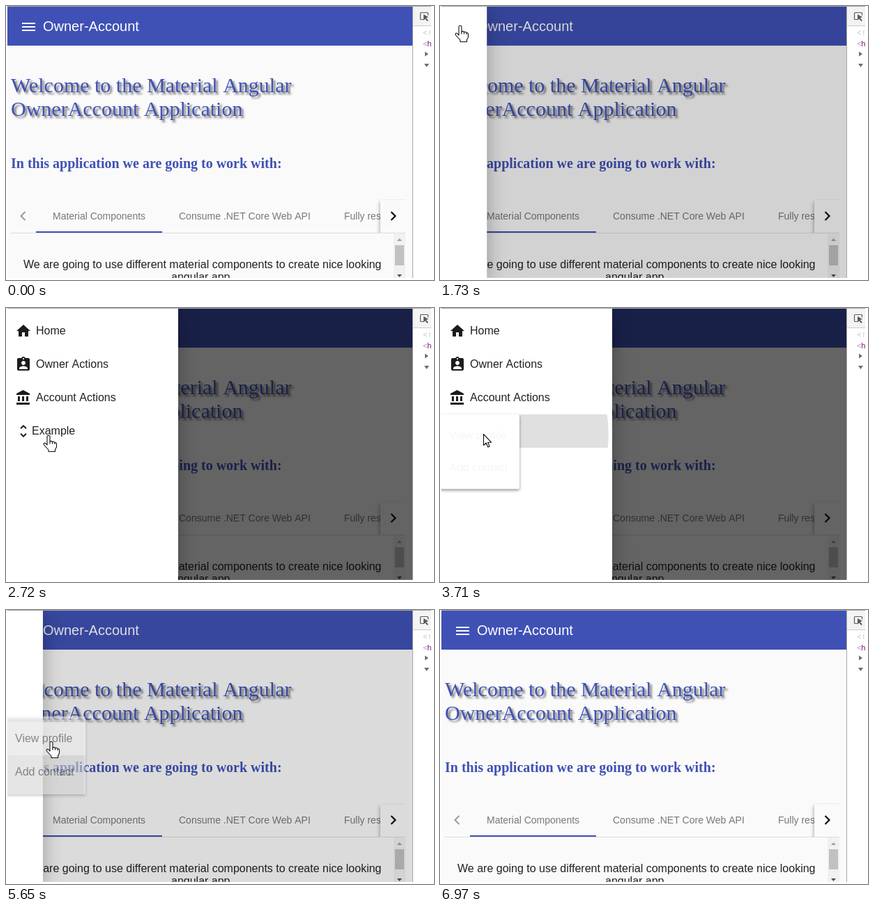
Recreate the animation shown at these times as an HTML page with a canvas. Size 614 by 394 pixels, loop 7100 ms.

```html
<!DOCTYPE html>
<html lang="en">
<head>
<meta charset="utf-8">
<title>Owner-Account</title>
<style>
html, body { margin: 0; width: 100%; height: 100%; overflow: hidden; background: #fff; }
canvas { display: block; }
</style>
</head>
<body>
<canvas id="stage" width="614" height="394"></canvas>
<script>
const ctx = document.getElementById('stage').getContext('2d');
const LOOP = 7100;
const SANS = '"Liberation Sans", Arial, sans-serif';
const SERIF = '"Liberation Serif", Times, serif';
const MONO = '"Liberation Mono", monospace';
const BLUE = '#3f51b5', INK = 'rgba(0,0,0,.87)';

const clamp = v => Math.min(1, Math.max(0, v));
const span = (t, start, length) => clamp((t - start) / length);

function bezier(x1, y1, x2, y2) {
  const at = (a, b, s) => 3 * (1 - s) * (1 - s) * s * a + 3 * (1 - s) * s * s * b + s * s * s;
  return x => {
    if (x <= 0 || x >= 1) return clamp(x);
    let lo = 0, hi = 1;
    for (let i = 0; i < 24; i++) {
      const mid = (lo + hi) / 2;
      if (at(x1, x2, mid) < x) lo = mid; else hi = mid;
    }
    return at(y1, y2, lo);
  };
}
const swift = bezier(.25, .8, .25, 1);
const decelerate = bezier(0, 0, .2, 1);
const late = bezier(.55, 0, .55, .2);

const icons = {
  home: 'M10 20v-6h4v6h5v-8h3L12 3 2 12h3v8z',
  owner: 'M19 3h-4.18C14.4 1.84 13.3 1 12 1c-1.3 0-2.4.84-2.82 2H5c-1.1 0-2 .9-2 2v14c0 1.1.9 2 2 2h14c1.1 0 2-.9 2-2V5c0-1.1-.9-2-2-2zm-7 0c.55 0 1 .45 1 1s-.45 1-1 1-1-.45-1-1 .45-1 1-1zm0 4c1.66 0 3 1.34 3 3s-1.34 3-3 3-3-1.34-3-3 1.34-3 3-3zm6 12H6v-1.4c0-2 4-3.1 6-3.1s6 1.1 6 3.1V19z',
  bank: 'M4 10v7h3v-7H4zm6 0v7h3v-7h-3zM2 22h19v-3H2v3zm14-12v7h3v-7h-3zm-4.5-9L2 6v2h19V6l-9.5-5z',
  unfold: 'M12 5.83L15.17 9l1.41-1.41L12 3 7.41 7.59 8.83 9 12 5.83zm0 12.34L8.83 15l-1.41 1.41L12 21l4.59-4.59L15.17 15 12 18.17z'
};
const arrow = ['M.5 .5V16.5l3.7-3.5 2.6 6 2.4-1-2.6-5.8h5z'];
const hand = [
  'M-2 1.5Q0-1 2 1.5V9q2-1.5 3.5.5 2-1 3.5 1 2.2-.4 2.5 1.5V17l-2 3.5v3h-9.5v-2.5L-6 14.5q-2-3 .5-3.5 1.500 0 3.500 3z',
  'M2 9v3.500M5.500 9.500v3M9 10.500v2.500'
];
const drawerItems = [
  ['home', 'Home', 43], ['owner', 'Owner Actions', 43],
  ['bank', 'Account Actions', 43], ['unfold', 'Example', 37]
];

// time, x, y of the pointer's hot spot
const track = [
  [610, 72, 352], [720, 38, 230], [820, 12, 130], [920, 26, 87], [1060, 25, 70],
  [1160, 24, 43], [1310, 29, 28], [2170, 29, 28], [2720, 61, 183], [2860, 62, 181],
  [4300, 62, 181], [4490, 62, 224], [4820, 62, 224], [5210, 65, 189],
  [6200, 65, 189], [6215, 91, 275], [6280, 91, 275]
];
const handTimes = [[1160, 3475], [4000, 5790]];

function rect(x, y, w, h, color) {
  ctx.fillStyle = color;
  ctx.fillRect(x, y, w, h);
}

function text(str, x, y, font, color) {
  ctx.font = font;
  ctx.fillStyle = color;
  ctx.fillText(str, x, y);
}

function shape(points, color) {
  ctx.fillStyle = color;
  ctx.fill(new Path2D('M' + points + 'z'));
}

function line(path, color, width) {
  ctx.strokeStyle = color;
  ctx.lineWidth = width;
  ctx.stroke(new Path2D(path));
}

function shadow(color, dx, dy, blur) {
  ctx.shadowColor = color;
  ctx.shadowOffsetX = dx;
  ctx.shadowOffsetY = dy;
  ctx.shadowBlur = blur;
}

// Runs paint inside a clipped, restored state
function clipped(x, y, w, h, paint) {
  ctx.save();
  ctx.beginPath();
  ctx.rect(x, y, w, h);
  ctx.clip();
  paint();
  ctx.restore();
}

function drawPage() {
  rect(2, 1, 581, 390, '#fafafa');
  rect(2, 1, 581, 56, BLUE);
  for (const y of [24, 29, 34]) rect(23, y, 19, 2, '#fff');
  text('Owner-Account', 53, 36, '20px ' + SANS, '#fff');

  ctx.save();
  shadow('rgba(0,0,0,.55)', 3, 3, 3);
  text('Welcome to the Material Angular', 7, 124, '30px ' + SERIF, BLUE);
  text('OwnerAccount Application', 7, 158, '30px ' + SERIF, BLUE);
  ctx.restore();
  text('In this application we are going to work with:', 7, 233, 'bold 20px ' + SERIF, BLUE);

  rect(7, 326, 566, 1, '#dcdcdc');
  clipped(43, 278, 530, 48, () => {
    const tab = (str, x) => text(str, x, 307, '14px ' + SANS, 'rgba(0,0,0,.52)');
    tab('Material Components', 67);
    tab('Consume .NET Core Web API', 248);
    tab('Fully responsive', 485);
    rect(43, 324, 181, 2, BLUE);
    shadow('rgba(0,0,0,.4)', 0, 3, 6);
    rect(537, 279, 40, 60, '#fafafa');
  });
  line('M27.500 296l-6 6 6 6', '#9a9a9a', 2);
  line('M552.500 296l6 6-6 6', '#111', 2.2);

  text('We are going to use different material components to create nice looking', 25, 377, '16px ' + SANS, INK);
  text('angular app', 237, 395, '16px ' + SANS, INK);

  rect(556, 327, 17, 64, '#f1f1f1');
  rect(558, 344, 13, 29, '#c1c1c1');
  shape('561 338h7l-3.500-4', '#a3a3a3');
  shape('561 386h7l-3.500 4', '#505050');
}

function drawDevtools() {
  rect(583, 1, 1, 390, '#a8a8a8');
  rect(584, 1, 26, 27, '#f3f3f3');
  rect(584, 28, 26, 1, '#ccc');
  line('M599 19.500h-3.500q-1 0-1-1v-8q0-1 1-1h9q1 0 1 1v3', '#5a5a5a', 1.2);
  shape('599 12v8.500l2.300-2 3 3.500 1.500-1.500-3-3.200 3.200-1.300', '#5a5a5a');
  const mono = '11px ' + MONO;
  text('<!', 598, 42, mono, '#c0c0c0');
  text('<', 598, 58, mono, '#a894a6');
  text('h', 604, 58, mono, '#881280');
  shape('601 65.500v7l5-3.500', '#6e6e6e');
  shape('600 83h7l-3.500 5', '#6e6e6e');
}

function drawDrawer(t, open) {
  if (open <= 0) return;
  rect(2, 1, 581, 390, `rgba(0,0,0,${.6 * open})`);
  ctx.save();
  ctx.translate(245 * (open - 1), 0);
  ctx.save();
  shadow('rgba(0,0,0,.3)', 0, 6, 26);
  rect(2, 1, 245, 390, '#fff');
  ctx.restore();
  drawerItems.forEach(([icon, label, x], i) => {
    const y = 33 + 48 * i;
    ctx.save();
    ctx.translate(13, y - 12);
    ctx.fillStyle = '#1c1c1c';
    ctx.fill(new Path2D(icons[icon]));
    ctx.restore();
    text(label, x, y + 5, '16px ' + SANS, INK);
  });
  if (t > 3370 && t < 4220) clipped(2, 153, 245, 48, () => {
    const alpha = .12 * (1 - decelerate(span(t, 3820, 400)));
    ctx.fillStyle = `rgba(0,0,0,${alpha})`;
    ctx.beginPath();
    ctx.arc(62, 181, 186 * decelerate(span(t, 3370, 450)), 0, 7);
    ctx.fill();
  });
  ctx.restore();
}

function drawMenu(t) {
  const enter = span(t, 3475, 100);
  const alpha = enter * (1 - span(t, 5575, 150));
  if (alpha <= 0) return;
  ctx.save();
  ctx.globalAlpha = alpha;
  ctx.translate(-3, 153);
  ctx.scale(.01 + .99 * enter, .01 + .49 * enter + .5 * swift(span(t, 3575, 300)));
  ctx.save();
  shadow('rgba(0,0,0,.42)', 0, 2, 4);
  ctx.fillStyle = '#fff';
  ctx.beginPath();
  ctx.roundRect(0, 0, 117, 112, 2);
  ctx.fill();
  ctx.restore();
  ctx.globalAlpha = alpha * late(span(t, 3575, 400));
  rect(0, 8, 117, 48, '#f4f4f4');
  text('View profile', 16, 37, '16px ' + SANS, INK);
  text('Add contact', 16, 85, '16px ' + SANS, INK);
  ctx.restore();
}

function drawPointer(t) {
  const next = track.findIndex(p => p[0] > t);
  if (next < 1) return;
  const [t0, x0, y0] = track[next - 1], [t1, x1, y1] = track[next];
  const k = (t - t0) / (t1 - t0);
  const isHand = handTimes.some(([from, to]) => t >= from && t < to);
  ctx.save();
  ctx.translate(Math.round(x0 + (x1 - x0) * k), Math.round(y0 + (y1 - y0) * k));
  ctx.lineJoin = 'round';
  (isHand ? hand : arrow).forEach((d, i) => {
    ctx.fillStyle = '#fff';
    if (!i) ctx.fill(new Path2D(d));
    line(d, '#111', 1.1);
  });
  ctx.restore();
}

function draw(t) {
  const open = swift(span(t, 1690, 500)) - swift(span(t, 5498, 500));
  rect(0, 0, 614, 394, '#fff');
  rect(2, 0, 608, 1, '#a8a8a8');
  clipped(2, 1, 581, 390, () => {
    drawPage();
    drawDrawer(t, open);
    drawMenu(t);
    drawPointer(t);
  });
  clipped(583, 1, 27, 390, drawDevtools);
}

function frame(now) {
  draw(now % LOOP);
  requestAnimationFrame(frame);
}
requestAnimationFrame(frame);
</script>
</body>
</html>
```
